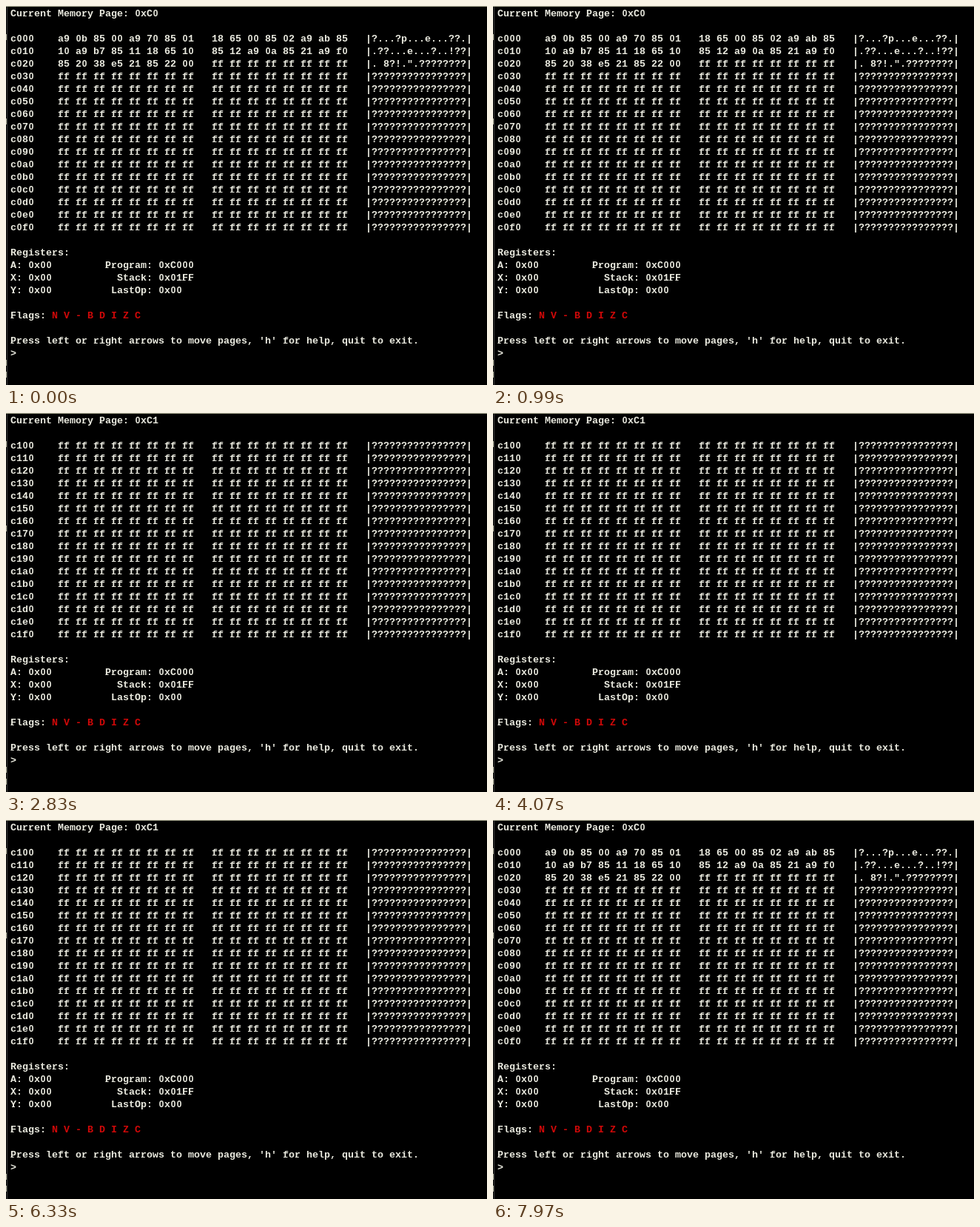
Animation, 650 px wide and 512 px high, one loop 7.99 s. Source, as an HTML page with a canvas:

```html
<!DOCTYPE html>
<html lang="en">
<head>
<meta charset="utf-8">
<title>Memory monitor</title>
<style>
  html, body { margin: 0; width: 100%; height: 100%; overflow: hidden; background: #000; }
  canvas { display: block; }
</style>
</head>
<body>
<canvas id="screen" width="650" height="512"></canvas>
<script>
const ctx = document.getElementById('screen').getContext('2d');

const LOOP = 7990;
const CELL = 8, LINE = 17, LEFT = 6, BASE = 14;
const INK = '#ebebe0', RED = '#d00808';
const MONO = 'bold 13.33px "Liberation Mono", monospace';
const ZERO = 'bold 12px "Liberation Sans", sans-serif';

// Time in ms and the memory page shown from then on.
const STEPS = [[0, 0xc0], [2090, 0xc1], [5030, 0xc2], [6330, 0xc1], [6710, 0xc0]];

const PROGRAM = ('a9 0b 85 00 a9 70 85 01 18 65 00 85 02 a9 ab 85 ' +
  '10 a9 b7 85 11 18 65 10 85 12 a9 0a 85 21 a9 f0 ' +
  '85 20 38 e5 21 85 22 00').split(' ');

// Slab feet for letters: left edge and width inside the cell.
const FEET = { f: [1, 5.5], r: [0.8, 5], F: [0.4, 4.2], P: [0.4, 4.2], Y: [2, 4] };

const hex = (n, width) => n.toString(16).padStart(width, '0');

function toChar(byte) {
  const code = parseInt(byte, 16);
  if (code >= 0xa0) return '?';
  return code >= 0x20 && code < 0x7f ? String.fromCharCode(code) : '.';
}

function dumpRow(page, row) {
  const bytes = Array.from({ length: 16 }, (_, i) =>
    (page === 0xc0 && PROGRAM[row * 16 + i]) || 'ff');
  return hex(page * 256 + row * 16, 4) + '    ' +
    bytes.slice(0, 8).join(' ') + '   ' + bytes.slice(8).join(' ') +
    '   |' + bytes.map(toChar).join('') + '|';
}

function write(text, col, row, color = INK) {
  const y = BASE + row * LINE;
  ctx.fillStyle = color;
  [...text].forEach((ch, i) => {
    if (ch === ' ') return;
    const x = LEFT + (col + i) * CELL;
    ctx.font = ch === '0' ? ZERO : MONO; // plain zero without a dot
    ctx.fillText(ch, x + CELL / 2, y);
    const foot = FEET[ch];
    if (foot) ctx.fillRect(x + foot[0], y - 1, foot[1], 1);
  });
}

function drawEdges() {
  ctx.fillStyle = '#3c3c3c';
  ctx.fillRect(1, 0, 1, 512);
  ctx.fillStyle = '#a8a890';
  ctx.fillRect(0, 0, 650, 1);
  for (const y of [38, 152, 478, 494]) ctx.fillRect(0, y, 1, 8);
}

function drawPage(page) {
  ctx.fillStyle = '#000';
  ctx.fillRect(0, 0, 650, 512);
  drawEdges();
  ctx.textAlign = 'center';

  write('Current Memory Page: 0x' + hex(page, 2).toUpperCase(), 0, 0);
  for (let row = 0; row < 16; row++) write(dumpRow(page, row), 0, row + 2);

  write('Registers:', 0, 19);
  [['A', 'Program', 'C000'], ['X', 'Stack', '01FF'], ['Y', 'LastOp', '00']]
    .forEach(([name, label, value], i) => {
      write(name + ': 0x00', 0, 20 + i);
      write((label + ':').padStart(8) + ' 0x' + value, 16, 20 + i);
    });

  write('Flags:', 0, 24);
  write('N V - B D I Z C', 7, 24, RED);
  write("Press left or right arrows to move pages, 'h' for help, quit to exit.", 0, 26);
  write('>', 0, 27);
}

let shown = null;
const start = performance.now();

function frame() {
  const time = (performance.now() - start) % LOOP;
  const page = STEPS.filter(([at]) => at <= time).pop()[1];
  if (page !== shown) drawPage(shown = page);
  requestAnimationFrame(frame);
}
frame();
</script>
</body>
</html>
```
